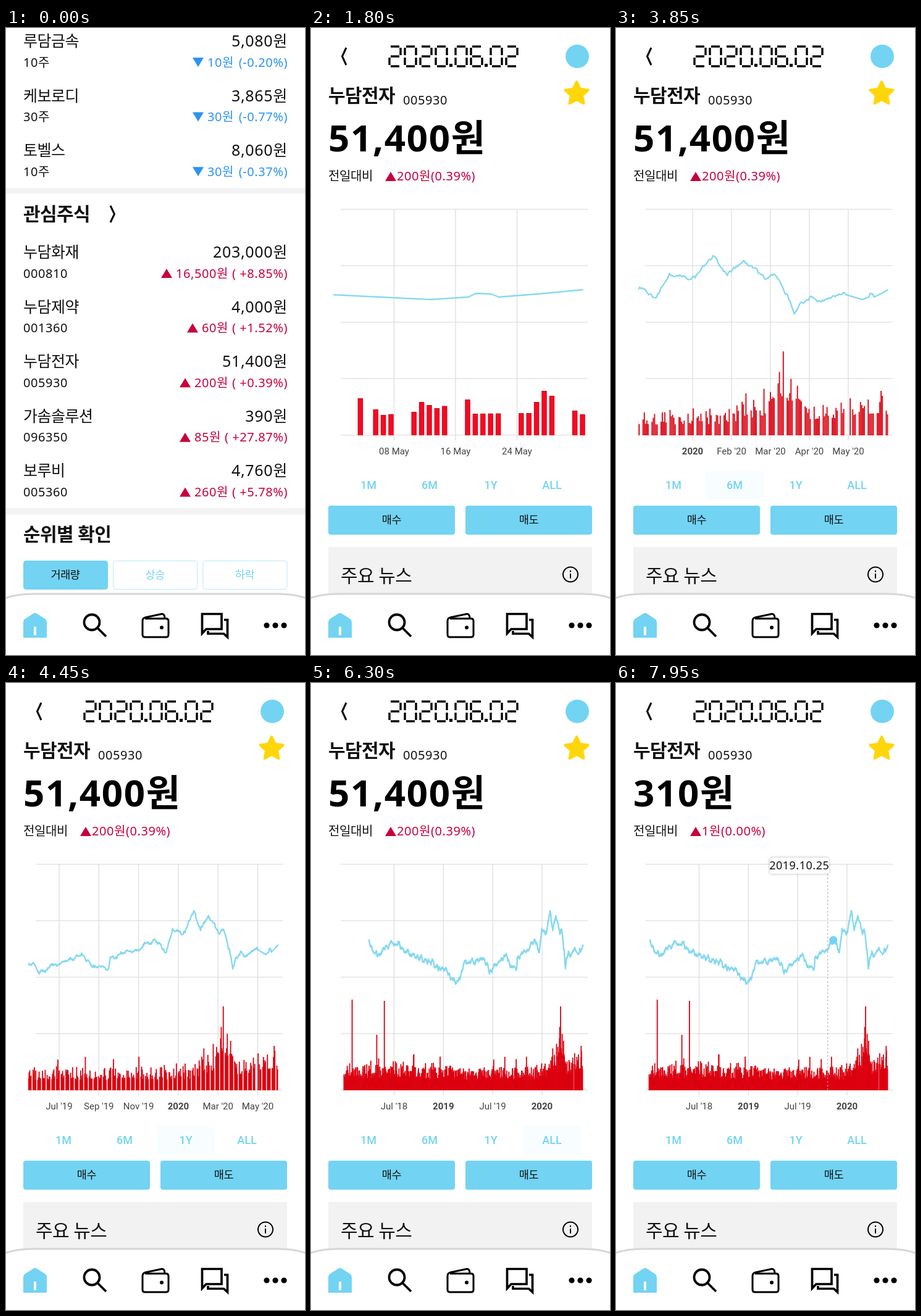
These frames come from a looping animation (484x1016 px, 8000 ms). An HTML page with a canvas:

```html
<!DOCTYPE html>
<html lang="ko">
<head>
<meta charset="utf-8">
<style>
  html, body { margin: 0; width: 484px; height: 1016px; overflow: hidden; background: #fff; }
  canvas { display: block; }
</style>
</head>
<body>
<canvas id="stage" width="484" height="1016"></canvas>
<script>
const g = document.getElementById('stage').getContext('2d');
const SKY = '#73d3f3', UP = '#c8003c', DOWN = '#2b93f0', INK = '#111', GRID = '#dedede';
const SANS = "'Noto Sans','Noto Sans CJK KR',sans-serif", ROBOTO = 'Roboto,sans-serif';
const STOCK = '누담전자', CODE = '005930';

// ---------- helpers ----------
const rnd = n => { const s = Math.sin(n * 12.9898) * 43758.5453; return s - Math.floor(s); };
const clamp = p => Math.max(0, Math.min(1, p));
const smooth = p => p * p * (3 - 2 * p);
const easeOut = p => 1 - (1 - p) ** 3;
const overshoot = p => 1 + 2.9 * (p - 1) ** 3 + 1.9 * (p - 1) ** 2;

// Value at x on a polyline of [x, y] pairs
function at(points, x) {
  const i = points.findIndex(p => p[0] > x);
  if (i === 0) return points[0][1];
  if (i < 0) return points[points.length - 1][1];
  const [x0, y0] = points[i - 1], [x1, y1] = points[i];
  return y0 + (y1 - y0) * (x - x0) / (x1 - x0);
}

function text(str, x, y, size, { color = INK, weight = 400, align = 'left', font = SANS } = {}) {
  g.font = `${weight} ${size}px ${font}`;
  g.letterSpacing = font === ROBOTO ? '0px' : (/\d/.test(str) ? .028 : -.02) * size + 'px';
  g.textAlign = align;
  g.fillStyle = color;
  g.fillText(str, x, y);
}

function box(x, y, w, h, r, fill, stroke) {
  g.beginPath();
  g.roundRect(x, y, w, h, r);
  if (fill) { g.fillStyle = fill; g.fill(); }
  if (stroke) { g.strokeStyle = stroke; g.lineWidth = 1; g.stroke(); }
}

function stroke(path, width, color = '#000', join = 'miter') {
  g.lineWidth = width;
  g.strokeStyle = color;
  g.lineJoin = join;
  g.stroke(new Path2D(path));
}

function fill(path, color) {
  g.fillStyle = color;
  g.fill(new Path2D(path));
}

function dot(x, y, r, color) {
  g.beginPath();
  g.arc(x, y, r, 0, 7);
  g.fillStyle = color;
  g.fill();
}

const triangle = (x, y, up) => up
  ? fill(`M${x} ${y + 15}h18l-9 -15z`, UP)
  : fill(`M${x} ${y}h18l-9 15z`, DOWN);

// ---------- list page ----------
const owned = [
  ['루담금속', '10주', '5,080원', 302, '10원', '(-0.20%)'],
  ['케보로디', '30주', '3,865원', 302, '30원', '(-0.77%)'],
  ['토벨스', '10주', '8,060원', 302, '30원', '(-0.37%)']
];
const watched = [
  ['누담화재', '000810', '203,000원', 251, '16,500원', '( +8.85%)'],
  ['누담제약', '001360', '4,000원', 293, '60원', '( +1.52%)'],
  [STOCK, CODE, '51,400원', 281, '200원', '( +0.39%)'],
  ['가솜솔루션', '096350', '390원', 281, '85원', '( +27.87%)'],
  ['보루비', '005360', '4,760원', 281, '260원', '( +5.78%)']
];

function stockRows(rows, top, up) {
  const color = up ? UP : DOWN;
  rows.forEach(([name, sub, price, x, change, percent], i) => {
    const y = top + i * 88.6;
    text(name, 28, y + 9, 25);
    text(price, 456, y + 9, 25, { align: 'right' });
    text(sub, 28, y + 41.5, 20);
    triangle(x, y + 27, up);
    text(change, x + 24, y + 41.5, 20, { color });
    text(percent, 456, y + 41.5, 20, { color, align: 'right' });
  });
}

function listPage() {
  stockRows(owned, 21, false);
  box(0, 259, 484, 9, 0, '#f3f3f3');
  text('관심주식', 28, 312, 30, { weight: 700 });
  stroke('M169 288l6.5 13.5l-6.5 13.5', 3);
  stockRows(watched, 363, true);
  box(0, 778, 484, 10, 0, '#f3f3f3');
  text('순위별 확인', 28, 831, 30, { weight: 700 });
  ['거래량', '상승', '하락'].forEach((label, i) => {
    const x = 28 + 145.2 * i;
    box(x + .5, 863.5, 136, 46, 4, i ? '#fff' : SKY, i ? '#b9e8f8' : SKY);
    text(label, x + 68, 892, 17.5, { weight: 500, align: 'center', color: i ? SKY : INK });
  });
}

// ---------- detail page ----------
const segments = ['M3 0H17', 'M19 2V14', 'M19 18V30', 'M3 32H17', 'M1 18V30', 'M1 2V14', 'M3 16H17'];
const lit = { 0: '012345', 2: '01643', 6: '023456' };

function segmentDate(str, x, y) {
  g.save();
  g.translate(x, y);
  for (const c of str) {
    if (c === '.') {
      box(-2, 28, 5, 5, 0, '#000');
      g.translate(7, 0);
    } else {
      for (const s of lit[c]) stroke(segments[s], 3.4);
      g.translate(25, 0);
    }
  }
  g.restore();
}

function star(cx, cy) {
  let d = '';
  for (let i = 0; i < 10; i++) {
    const r = i % 2 ? 9.5 : 19.5, a = i * Math.PI / 5;
    d += `${i ? 'L' : 'M'}${cx + r * Math.sin(a)} ${cy - r * Math.cos(a)}`;
  }
  fill(d + 'z', '#ffd60a');
  stroke(d + 'z', 4, '#ffd60a', 'round');
}

function pageShell() {
  stroke('M57 32l-6.5 14l6.5 14', 3);
  segmentDate('2020.06.02', 126, 30);
  dot(431, 46, 19, SKY);
  star(430, 106.5);
  [[28, '매수'], [250, '매도']].forEach(([x, label]) => {
    box(x, 774, 205, 47, 4, SKY);
    text(label, x + 102.5, 803, 17.5, { weight: 500, align: 'center' });
  });
  box(28, 841, 427, 80, 0, '#f2f2f2');
  text('주요 뉴스', 48, 898, 30);
  stroke('M408 885.5a12 12 0 1 0 24 0a12 12 0 1 0 -24 0M420 884v8M420 879v2.5', 2);
}

function quote(t) {
  // The counter restarts each time the pointer reaches another day
  const since = t < 7400 ? t - 740 : (t - 7400) % 165.5;
  const share = clamp(since / 689.4) ** 2;
  const price = Math.round(51400 * share / 10) * 10;
  text(STOCK, 28, 119.5, 30, { weight: 700 });
  text(CODE, 149, 123.5, 20);
  text(price.toLocaleString('en-US') + '원', 28, 200, 60, { weight: 600, color: '#000' });
  text('전일대비', 28, 247, 20);
  triangle(120, 233, true);
  text(`${Math.floor(200 * share)}원(${(.39 * share).toFixed(2)}%)`, 139, 247, 20, { color: UP });
}

// ---------- chart ----------
const RIGHT = 440.5, DAYS = 881, SECOND_OF_JUNE = Date.UTC(2020, 5, 2);

// Turning points of the price: [age in days, y]; a seeded wobble fills in between
const trend = [
  [0, 424], [5, 430], [11, 436], [12, 431], [14, 430], [15, 436], [20, 440], [33, 432], [47, 437], [68, 441],
  [73, 464], [78, 432], [89, 396], [95, 408], [102, 390], [112, 378], [125, 402], [135, 374], [154, 404],
  [170, 403], [181, 432], [199, 414], [233, 436], [270, 445], [273, 461], [300, 463], [311, 444], [334, 448],
  [383, 470], [405, 450], [483, 450], [515, 487], [579, 462], [700, 440], [782, 419], [846, 442], [880, 421]
];
const wobble = age => {
  const i = Math.floor(age / 5), f = age / 5 - i;
  return (rnd(age) - .5) * 4 + (rnd(i) * (1 - f) + rnd(i + 1) * f - .5) * 11;
};
const lineY = age => at(trend, age) + (age > 33 ? wobble(age) : 0);

// Typical volume by age, and a few single days far above it
const level = [
  [0, 34], [1, 40], [5, 72], [7, 36], [14, 35], [15, 58], [19, 44], [21, 54], [22, 38], [26, 33], [29, 60],
  [30, 42], [60, 44], [68, 95], [83, 92], [87, 62], [105, 46], [130, 30], [400, 27], [860, 34]
];
const peaks = { 81: 136, 732: 145, 760: 90, 851: 147 };
const holidays = [28, 32, 33];

const bars = [];
for (let age = 0; age <= DAYS; age++) {
  const weekday = new Date(SECOND_OF_JUNE - age * 864e5).getUTCDay();
  if (weekday % 6 === 0 || holidays.includes(age)) continue;
  const vary = age < 30 ? 1 : .6 + .7 * rnd(age + 5) ** 2 + .9 * rnd(age + 9) ** 14;
  bars.push([age, peaks[age] || at(level, age) * vary]);
}

// Scale is in px per day; ticks are evenly spaced
const ranges = [
  { name: '1M', press: 1900, scale: 12.4, first: 134.5, step: 99.5, ticks: ['08 May', '16 May', '24 May'] },
  { name: '6M', press: 2800, scale: 2.083, first: 124, step: 63, ticks: ['2020', "Feb '20", "Mar '20", "Apr '20", "May '20"] },
  { name: '1Y', press: 3950, scale: 1.057, first: 86, step: 64.3, ticks: ["Jul '19", "Sep '19", "Nov '19", '2020', "Mar '20", "May '20"] },
  { name: 'ALL', press: 5650, scale: .438, first: 134.5, step: 79.8, ticks: ["Jul '18", '2019', "Jul '19", '2020'] }
];

// Index of the chosen range and the zoom on its way there
const rangeAt = t => Math.max(0, ranges.findLastIndex(r => t > r.press));
function zoomAt(t, duration, ease) {
  const i = rangeAt(t), { scale, press } = ranges[i];
  const from = ranges[Math.max(0, i - 1)].scale;
  return from * (scale / from) ** ease(clamp((t - press - 100) / duration));
}

function rangeButtons(t) {
  ranges.forEach(({ name, press }, i) => {
    const x = 93 + 99 * i, end = ranges[i + 1]?.press ?? 7400;
    if (t >= press && t < end + 100) {
      g.globalAlpha = at([[press, .15], [press + 50, .3], [press + 200, .3], [press + 500, .05]], t);
      box(x - 47, 718, 94, 46, 4, SKY);
      g.globalAlpha = 1;
    }
    text(name, x, 747, 18, { weight: 500, color: SKY, align: 'center', font: ROBOTO });
  });
}

function axes(t) {
  const { ticks, first, step } = ranges[rangeAt(t)];
  for (let i = 0; i < 5; i++) stroke(`M48 ${293.7 + 91.5 * i}H448`, 1.3, GRID);
  ticks.forEach((label, i) => {
    const x = first + step * i, weight = /^\d{4}$/.test(label) ? 700 : 400;
    stroke(`M${x} 293V668`, 1.3, GRID);
    text(label, x, 691, 15, { weight, color: '#444', align: 'center', font: ROBOTO });
  });
}

function volume(t, unsettled) {
  const stretch = 1 + .07 * unsettled, zoom = zoomAt(t, 600, easeOut) * stretch;
  const grow = clamp((t - 700) / 250) * stretch;
  const width = Math.max(zoom * .68, 1.8), wide = zoom > 4;
  for (const [age, h] of bars) {
    const x = RIGHT - 1 + 25.5 * unsettled - age * zoom - width / 2, top = 660 - h * grow;
    g.fillStyle = wide ? '#c8001c' : '#dc0010';
    g.fillRect(x, top, width, h * grow);
    if (wide) {
      g.fillStyle = '#f80820';
      g.fillRect(x + 1, top + 1, width - 2, h * grow - 1);
    }
  }
}

function priceLine(t, unsettled) {
  const zoom = zoomAt(t, 950, overshoot);
  g.beginPath();
  for (let age = 0; age <= DAYS; age++) g.lineTo(RIGHT - age * zoom, lineY(age) - 20 * unsettled);
  g.strokeStyle = '#85d8f0';
  g.lineWidth = 2.4;
  g.lineJoin = 'round';
  g.stroke();
}

function pointer(t) {
  const x = 342.7 - (7950 - t) * .08, { scale } = ranges[3];
  const day = new Date(SECOND_OF_JUNE - Math.round((RIGHT - 1 - x) / scale) * 864e5);
  g.setLineDash([3, 3]);
  stroke(`M${x} 309V660`, 1, '#aaa');
  g.setLineDash([]);
  dot(x + 9, at(trend, (RIGHT - x - 9) / scale), 6.5, SKY);
  g.shadowColor = 'rgba(0,0,0,.3)';
  g.shadowBlur = 4;
  box(x - 94, 283, 96, 26, 4, '#fff');
  g.shadowColor = 'transparent';
  text(day.toISOString().slice(0, 10).replaceAll('-', '.'), x - 46, 301.5, 18, { align: 'center' });
}

function detailPage(t) {
  pageShell();
  rangeButtons(t);
  if (t < 700) return;
  const unsettled = 1 - smooth(clamp((t - 1000) / 450));
  quote(t);
  axes(t);
  g.save();
  g.beginPath();
  g.rect(36, 280, 419, 381);
  g.clip();
  volume(t, unsettled);
  priceLine(t, unsettled);
  g.restore();
  if (t >= 7400) pointer(t);
}

// ---------- bottom bar ----------
function navBar() {
  const edge = 'M-2 924C12 919 24 917 44 917H440C460 917 472 919 486 924';
  fill(edge + 'V1016H-2z', '#fff');
  stroke(edge, 3, '#d6d6d6');
  fill('M28 988V963Q28 960 30 958L44 949Q47 947 50 949L64 958Q66 960 66 963V988z', SKY);
  box(45, 970, 4, 14, 0, '#fff');
  stroke('M126.5 963a12.5 12.5 0 1 0 25 0a12.5 12.5 0 1 0 -25 0M148 972L162 986', 3.8);
  stroke('M225 957H259Q263 957 263 961V983Q263 987 259 987H225Q221 987 221 983V961Q221 956 226 955L252 949.5Q257 949 257 957', 3, '#000', 'round');
  dot(252, 971.5, 3, '#000');
  stroke('M317.5 949.5H349V974H324L317.5 981zM353 959H358.5V987L352.5 981.5H327V977', 3.7);
  for (const x of [422, 436, 450]) dot(x, 968, 4.6, '#000');
}

function draw() {
  const t = Math.floor(performance.now() % 8000 / 50) * 50;
  g.fillStyle = '#fff';
  g.fillRect(0, 0, 484, 1016);
  if (t < 350) listPage();
  else detailPage(t);
  navBar();
  requestAnimationFrame(draw);
}
draw();
</script>
</body>
</html>
```
